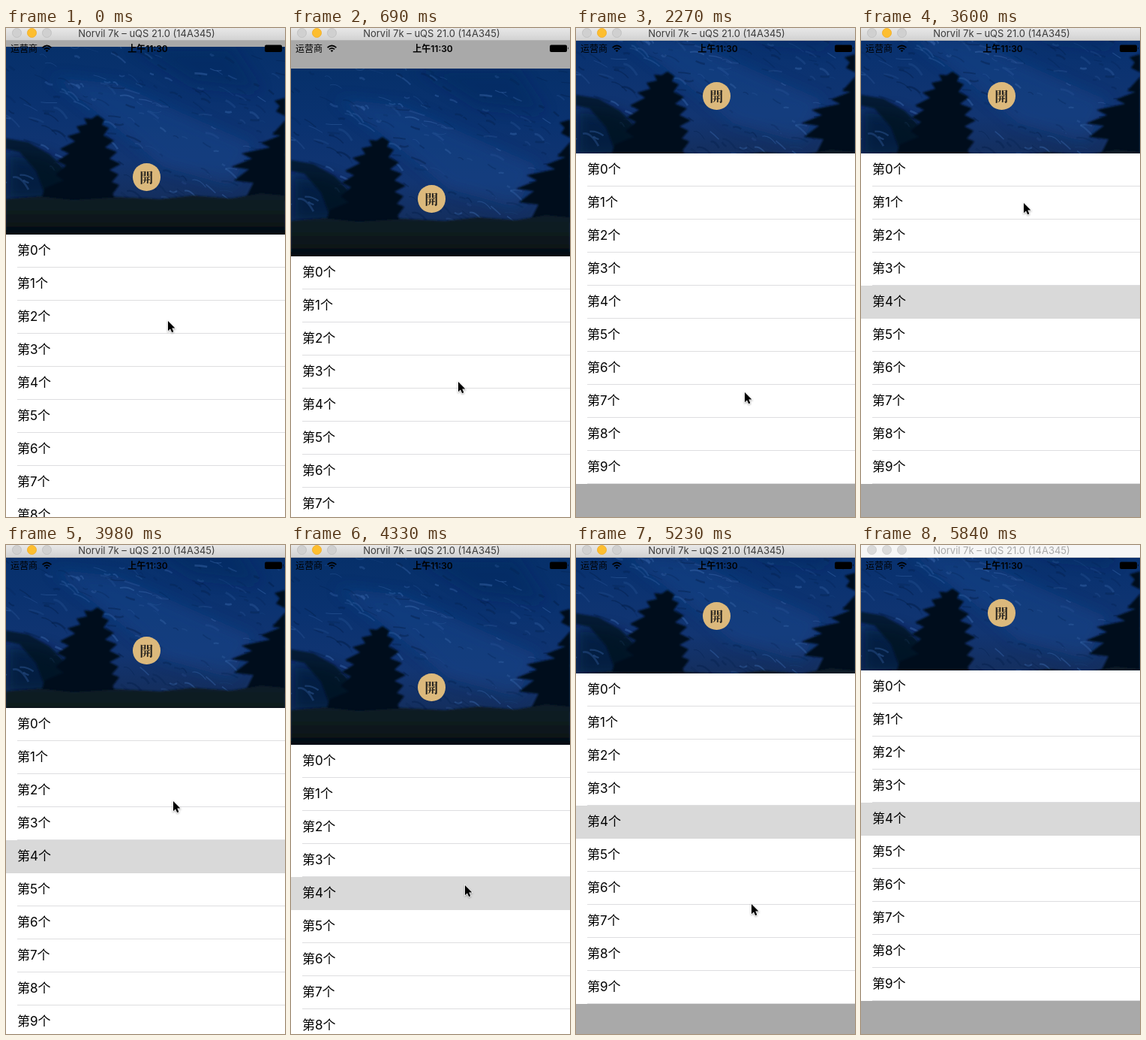
An HTML page that plays this animation: 372x651 px, repeating every 5.88 s.

```html
<!DOCTYPE html>
<html lang="zh-CN">
<head>
<meta charset="utf-8">
<title>Stretchy list header</title>
<style>
  html, body { margin: 0; width: 100%; height: 100%; overflow: hidden; background: #a9a9a9; }
  #stage { position: relative; width: 372px; height: 651px; overflow: hidden; background: #a9a9a9;
    color: #000; font-family: Inter, "Noto Sans CJK SC", "Noto Sans CJK", sans-serif; }
  #stage > * { position: absolute; left: 0; top: 0; }
  #header { width: 372px; overflow: hidden; }
  #photo { position: absolute; left: 0; top: 0; display: block; }
  #button { left: 169px; width: 36.5px; height: 36.5px; border-radius: 50%; background: #dcb97c; color: #26231f;
    font: 700 18px/37px "Noto Serif CJK SC", "Noto Sans CJK SC", "Noto Sans CJK", serif; text-align: center; }
  #list { width: 372px; }
  .row { position: relative; height: 44px; padding-left: 15px; background: #fff; font-size: 17px; line-height: 43px; white-space: nowrap; }
  .row::after { content: ""; position: absolute; left: 15px; right: 0; bottom: 0; height: 1px; background: #dedee0; }
  .row.selected, .row.selected::after { background: #d9d9d9; }
  #bar { width: 372px; height: 16px; background: linear-gradient(#e8e8e8, #d2d2d2); border-bottom: 1px solid #b2b2b2; }
  #title { position: absolute; left: 0; width: 375px; top: -1px; font-size: 13px; line-height: 16px;
    text-align: center; color: #3b3b3b; white-space: nowrap; }
  .light { position: absolute; top: 0; width: 11px; height: 11px; border-radius: 50%; background: #d0d0d0; border: .5px solid #c2c2c2; }
  .light.amber { background: #fdbe2f; border-color: #f3b12c; }
  #bar.inactive { background: #f6f6f6; border-color: #d0d0d0; }
  .inactive #title { color: #a8a8a8; }
  .inactive .light { background: #dadada; border-color: #cfcfcf; }
</style>
</head>
<body>
<div id="stage">
  <div id="header">
    <svg id="photo" width="372" height="250">
      <defs>
        <linearGradient id="rock" x2="0" y2="1">
          <stop offset="0" stop-color="#06306a"/>
          <stop offset=".3" stop-color="#0a3270"/>
          <stop offset=".6" stop-color="#123572"/>
          <stop offset=".85" stop-color="#142d5a"/>
        </linearGradient>
        <linearGradient id="ground" x2="0" y2="1">
          <stop offset="0" stop-color="#0c1a28"/>
          <stop offset=".5" stop-color="#0c1a1e"/>
          <stop offset="1" stop-color="#040c14"/>
        </linearGradient>
        <filter id="soft"><feGaussianBlur stdDeviation=".7"/></filter>
        <filter id="haze" x="-30%" y="-30%" width="160%" height="160%"><feGaussianBlur stdDeviation="9"/></filter>
        <filter id="edge"><feGaussianBlur stdDeviation="1.1"/></filter>
      </defs>
      <rect width="372" height="250" fill="url(#rock)"/>
      <g filter="url(#haze)">
        <path d="M60 40L150 50L250 95L330 130L300 185L210 160L150 110Z" fill="#1d4a92" opacity=".4"/>
        <path d="M170 0H300L340 60L250 50Z" fill="#04265c" opacity=".4"/>
        <path d="M0 140L50 145L90 165L80 205H0Z" fill="#081a3a" opacity=".8"/>
      </g>
      <g id="veins" filter="url(#soft)" fill="none"></g>
      <g filter="url(#edge)" fill="#050f1e">
        <path d="M0 122L30 127L58 143L75 160V205H55L40 165L18 140L0 136Z" opacity=".7"/>
        <path d="M122 91L114 96L104 95L108 103L94 106L99 114L82 119L92 126L72 136L84 142L68 152L80 158L66 170L76 178L52 188L46 205H148L142 196L151 184L141 180L150 170L138 164L153 156L138 149L148 140L132 134L144 125L130 118L137 108L128 104L131 97Z"/>
        <path d="M372 68L358 72L365 79L360 86L372 92ZM372 98L355 117L366 118L340 128L352 134L314 142L328 149L300 160L324 163L304 178L330 181L318 205H372Z"/>
      </g>
      <path d="M0 203L45 199L90 204L150 200L205 203L250 198L300 202L340 195L372 198V250H0Z" fill="url(#ground)" filter="url(#edge)"/>
      <rect y="244" width="372" height="6" fill="#040c14"/>
    </svg>
  </div>
  <div id="button">開</div>
  <div id="list"></div>
  <svg id="status" width="372" height="40" font-size="12">
    <text x="6" y="32">运营商</text>
    <path d="M48.6 26.2Q54.5 20.8 60.4 26.2M50.9 28.4Q54.5 25.2 58.1 28.4" fill="none" stroke="#000" stroke-width="1.7"/>
    <path d="M52.6 29.9Q54.5 28.4 56.4 29.9L54.5 31.9Z"/>
    <text x="189" y="32" text-anchor="middle" font-weight="600">上午11:30</text>
    <rect x="345" y="22.5" width="23" height="9.5" rx="2"/>
    <path d="M369 25.2Q370.8 27 369 28.8Z"/>
  </svg>
  <div id="bar">
    <i class="light" style="left:8px"></i><i class="light amber" style="left:28px"></i><i class="light" style="left:48px"></i>
    <div id="title">Norvil 7k – uQS 21.0 (14A345)</div>
  </div>
  <svg id="cursor" width="16" height="22" style="overflow:visible">
    <path d="M0 1V14.2L3 11.4L5.2 16.2L7.4 15.3L5.3 10.6H9.4Z" stroke="#fff" stroke-width="1.4" paint-order="stroke" style="filter:drop-shadow(0 1px 1px #0005)"/>
  </svg>
</div>
<script>
const LOOP = 5880, TOP = 17, REST = 150, FULL = 250, VIEW = 667;
const $ = id => document.getElementById(id);

// Screen refreshes: [first, last, count]
const refreshes = [[0, 600, 1], [60, 600, 7], [690, 690, 1], [780, 1020, 4], [1640, 2180, 7], [2270, 2270, 1],
  [2380, 2700, 6], [2870, 3400, 9], [3540, 3600, 2], [3650, 4070, 6], [4150, 4330, 3], [4410, 4670, 4],
  [4910, 4910, 1], [4960, 5410, 6], [5500, 5560, 2], [5840, 5840, 1]];
const ticks = refreshes.flatMap(([a, b, n]) =>
  Array.from({ length: n }, (_, i) => a + (n > 1 ? (b - a) * i / (n - 1) : 0)));

// Pointer path: [time, x, y]
const path = [[0, 216, 389], [600, 222, 461], [690, 223, 470], [1020, 225, 486], [2180, 225, 486], [2270, 225, 484],
  [2700, 220, 358], [2870, 220, 358], [3400, 216, 225], [3540, 217, 232], [3600, 217, 232], [4070, 227, 400],
  [4330, 232, 452], [4670, 234, 477], [5410, 234, 477], [5500, 236, 570], [5560, 240, 670], [LOOP, 240, 670]];

function pointer(t) {
  const i = Math.max(1, path.findIndex(p => p[0] >= t));
  const [t0, x0, y0] = path[i - 1], [t1, x1, y1] = path[i];
  const k = (t - t0) / (t1 - t0);
  return [x0 + (x1 - x0) * k, y0 + (y1 - y0) * k];
}

// Drags: pull resistance while held, critically damped spring after release
const drags = [{ from: 0, grip: 155.5, release: 1600 }, { from: 3600, grip: 241, release: 4806 }];
const rubber = d => VIEW * (1 - 1 / (1 + Math.max(0, d) * .55 / VIEW));

function pull(t) {
  const { grip, release } = drags[t < drags[1].from ? 0 : 1];
  const held = rubber(pointer(Math.min(t, release))[1] - grip);
  const u = Math.max(0, t - release) * .012;
  return held * (1 + u) * Math.exp(-u);
}

function draw(time) {
  const t = ticks.findLast(s => s <= time);
  const bottom = TOP + REST + Math.round(pull(t));
  const height = Math.min(FULL, bottom - TOP);
  $('header').style.top = bottom - height + 'px';
  $('header').style.height = height + 'px';
  $('photo').style.top = (height - FULL) / 2 + 'px';
  $('button').style.top = bottom - 95 + 'px';
  $('list').style.top = bottom + 'px';
  $('list').children[4].classList.toggle('selected', t >= 2870);
  $('bar').classList.toggle('inactive', t >= 5840);
  const [x, y] = pointer(t).map(Math.round);
  $('cursor').style.transform = `translate(${x}px, ${y}px)`;
}

$('list').innerHTML = Array.from({ length: 10 }, (_, i) => `<div class="row">第${i}个</div>`).join('');

// Fine diagonal veins on the mountain face
let seed = 11;
const random = () => (seed = seed * 16807 % 2147483647) / 2147483647;
$('veins').innerHTML = Array.from({ length: 220 }, (_, i) => {
  const x = random() * 390 - 20, y = random() * 200, length = 4 + random() * 18;
  const color = i % 2 ? '#3a68ac' : '#04204c';
  return `<path d="M${x} ${y}q${length / 2} ${random() * 8 - 3} ${length} ${length * (random() * .9)}"
    stroke="${color}" stroke-width="${.7 + random() * 2.3}" opacity="${.15 + random() * .35}"/>`;
}).join('');

const start = performance.now();
function frame() {
  draw((performance.now() - start) % LOOP);
  requestAnimationFrame(frame);
}
frame();
</script>
</body>
</html>
```
